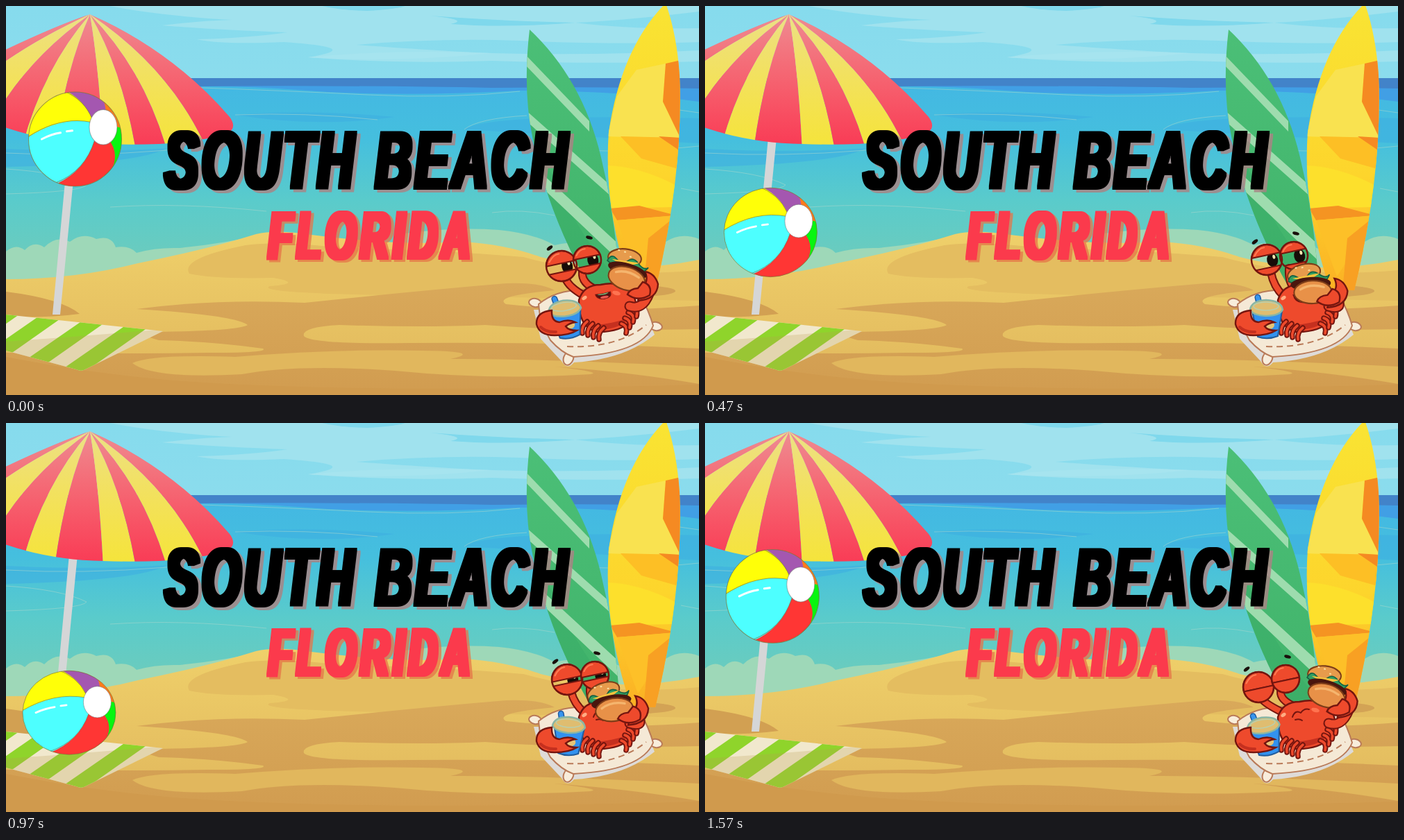
Animation of 998x561 px, one loop 1600 ms. Source, as an HTML page:

```html
<!DOCTYPE html>
<html lang="en">
<head>
<meta charset="utf-8">
<title>South Beach</title>
<style>
html, body { margin: 0; width: 100%; height: 100%; overflow: hidden; }
svg { display: block; width: 100vw; height: 100vh; }
text { font: italic 700 116px "Liberation Sans", Arial, sans-serif; }
</style>
</head>
<body>
<svg viewBox="0 0 998 561" preserveAspectRatio="none">
  <defs>
    <linearGradient id="sky" x2="0" y2="1"><stop stop-color="#86dbed"/><stop offset="1" stop-color="#8bdced"/></linearGradient>
    <linearGradient id="sea" x2="0" y2="1">
      <stop stop-color="#43b7e3"/><stop offset=".3" stop-color="#45bfde"/>
      <stop offset=".6" stop-color="#5acbcb"/><stop offset="1" stop-color="#72ccb8"/>
    </linearGradient>
    <linearGradient id="sand" x2="0" y2="1"><stop stop-color="#efd06a"/><stop offset="1" stop-color="#e0b65c"/></linearGradient>
    <linearGradient id="dark" x2="0" y2="1"><stop stop-color="#d9a95a"/><stop offset="1" stop-color="#d19c50"/></linearGradient>
    <linearGradient id="fade" x2="0" y2="1"><stop stop-color="#e3ddd0" stop-opacity=".5"/><stop offset="1" stop-color="#f2d4b0" stop-opacity="0"/></linearGradient>
    <linearGradient id="leaf" x2="0" y2="1"><stop stop-color="#4bbf77"/><stop offset="1" stop-color="#41b36a"/></linearGradient>
    <linearGradient id="gold" x2="0" y2="1"><stop stop-color="#f9e433"/><stop offset=".6" stop-color="#fdd52c"/><stop offset="1" stop-color="#fbb024"/></linearGradient>
    <clipPath id="canopyClip"><path d="M121 12Q60 32-60 92L-60 150Q30 197 140 199Q260 203 318 184Q334 176 322 160Q240 65 121 12Z"/></clipPath>
    <clipPath id="greenClip"><path id="greenShape" d="M754 34Q744 120 758 188Q780 300 842 408Q860 422 884 400Q876 300 860 232Q835 110 754 34Z"/></clipPath>
    <clipPath id="goldClip"><path id="goldShape" d="M950-4Q886 60 868 182Q860 290 900 408L935 410Q976 240 970 100Q966 40 950-4Z"/></clipPath>
    <clipPath id="towelClip"><path d="M0 445L226 469L112 525Q107 527 101 524L0 497Z"/></clipPath>
    <clipPath id="ballClip"><circle r="67"/></clipPath>
    <filter id="heavyBig" x="-5%" y="-20%" width="110%" height="140%" color-interpolation-filters="sRGB">
      <feMorphology operator="dilate" radius="4 2" result="fat"/>
      <feOffset dx="5" dy="4"/><feComponentTransfer result="soft"><feFuncR type="linear" slope="0" intercept=".66"/><feFuncG type="linear" slope="0" intercept=".52"/><feFuncB type="linear" slope="0" intercept=".52"/><feFuncA type="linear" slope=".85"/></feComponentTransfer>
      <feMerge><feMergeNode in="soft"/><feMergeNode in="fat"/></feMerge>
    </filter>
    <filter id="heavySmall" x="-5%" y="-20%" width="110%" height="140%" color-interpolation-filters="sRGB">
      <feMorphology operator="dilate" radius="4 2" result="fat"/>
      <feOffset dx="4" dy="3"/><feComponentTransfer result="soft"><feFuncR type="linear" slope="0" intercept=".9"/><feFuncG type="linear" slope="0" intercept=".46"/><feFuncB type="linear" slope="0" intercept=".28"/><feFuncA type="linear" slope=".75"/></feComponentTransfer>
      <feMerge><feMergeNode in="soft"/><feMergeNode in="fat"/></feMerge>
    </filter>
  </defs>

  <rect width="998" height="105" fill="url(#sky)"/>
  <g fill="#a9e4ef">
    <path d="M150 0H998V8Q900 20 820 24Q900 34 998 32V52Q880 56 740 50Q620 46 505 56Q640 66 700 68Q560 82 435 74Q520 60 400 52Q310 56 275 48Q350 46 405 38Q300 34 225 28Q270 22 325 20Q220 14 150 0Z" opacity=".75"/>
    <path d="M435 74Q560 62 700 68Q850 72 998 64V80Q830 84 700 79Q560 84 435 74Z" opacity=".75"/>
    <path d="M455 0H575Q560 5 520 7Q480 6 455 0Z" fill="#7fd8ec"/>
    <path d="M610 14Q720 22 820 24Q720 32 640 26Q670 20 610 14Z" fill="#7fd8ec"/>
  </g>
  <rect y="104" width="998" height="295" fill="url(#sea)"/>
  <path d="M0 104H998V138Q880 122 740 122Q560 132 420 121Q330 114 240 117H0Z" fill="#419fe5"/>
  <path d="M0 104H998V119Q860 116 700 118Q500 114 240 116H0Z" fill="#4283c9"/>
  <g fill="#3fb0e2" opacity=".6">
    <path d="M330 157Q430 148 560 160Q450 176 330 157ZM660 178Q690 155 998 162V198Q800 186 660 178ZM0 206Q120 212 232 205Q190 228 0 232Z"/>
  </g>
  <g fill="none" stroke="#a9d8cc" stroke-opacity=".55">
    <path d="M255 117Q400 122 520 128T740 123M330 157Q430 153 535 164M660 178Q680 162 750 158M0 212Q110 218 232 208M0 235Q80 240 116 258Q110 268 0 271M150 290Q250 283 375 296M840 208Q900 212 998 202M700 298Q740 292 790 302M970 150L998 154M972 263L998 268"/>
  </g>
  <g fill="#9ed8b8">
    <path d="M0 354Q14 342 27 352Q40 338 55 348Q72 330 92 340Q110 326 130 336Q152 330 158 348Q178 345 188 356Q215 348 250 349Q320 342 380 327V400H0Z"/>
    <path d="M560 330Q640 318 710 323Q760 328 790 345Q840 334 890 352Q930 350 950 340Q972 326 998 336V400H560Z"/>
  </g>
  <path d="M0 394Q100 394 190 371Q290 351 360 329Q390 322 440 330Q560 346 660 340Q720 344 770 362Q880 390 998 366V561H0Z" fill="url(#sand)"/>
  <path d="M345 345Q250 364 264 386Q300 394 385 392Q430 400 380 404Q360 412 500 416L998 425V381Q860 394 745 362Q600 350 480 349Q400 338 345 345Z" fill="#e4bd60"/>
  <path d="M0 412Q80 422 106 444Q60 450 0 448Z" fill="#d2a052"/>
  <path d="M188 437Q300 422 430 428Q600 410 720 400Q770 398 790 410Q700 418 720 430Q850 444 998 432V466Q820 470 690 460Q600 464 480 460Q425 463 429 476Q440 488 580 486Q800 484 998 494V561H0V500Q200 502 290 500Q380 500 370 494Q300 484 220 482L180 470Q330 470 348 460Q330 446 188 437Z" fill="url(#dark)"/>
  <path d="M182 515Q210 502 330 506Q480 494 600 497Q690 498 640 509Q760 508 998 520V545Q900 528 790 520Q860 528 842 531Q700 540 560 526Q420 516 340 531Q210 538 182 515Z" fill="#e1b75d"/>
  <path d="M0 506Q120 530 240 540Q500 560 998 546V561H0Z" fill="#d09a4d"/>
  <ellipse cx="894" cy="411" rx="70" ry="9" fill="#d3a355"/>
  <path d="M91 190L103 190L78 445L67 445Z" fill="#d5d6d7"/>
  <g id="canopy" clip-path="url(#canopyClip)"></g>
  <g id="towel" clip-path="url(#towelClip)"></g>

  <use href="#greenShape" fill="url(#leaf)"/>
  <g clip-path="url(#greenClip)">
    <path d="M746 130Q790 290 884 400L830 420L740 220Z" fill="#2f9f62" opacity=".25"/>
    <path d="M746 68L840 166V181L746 83ZM746 148L872 260V275L746 163ZM770 240L884 345V368L770 260Z" fill="#9edcae"/>
  </g>
  <use href="#goldShape" fill="url(#gold)"/>
  <g clip-path="url(#goldClip)">
    <path d="M908 92L950 83L946 138L972 192L866 188L880 130Z" fill="#f9e250"/>
    <path d="M950 83L972 78V192L946 138Z" fill="#f58a22"/>
    <path d="M885 188L972 190V236L915 220Z" fill="#fdbf25"/>
    <path d="M940 188L972 190V210Z" fill="#f58a22"/>
    <path d="M862 230Q910 230 968 260L960 290L866 292Z" fill="#fde02c"/>
    <path d="M870 292L912 288L965 302L880 309Z" fill="#f59422"/>
    <path d="M880 309L966 302L940 345L910 390Z" fill="#fdc028"/>
    <path d="M925 335L966 302L940 412H918Z" fill="#f8a023"/>
  </g>

  <g filter="url(#heavyBig)"><text transform="translate(229 263) scale(.62 1)" letter-spacing="8" word-spacing="3">SOUTH BEACH</text></g>
  <g filter="url(#heavySmall)"><text transform="translate(378 364) scale(.58 1)" letter-spacing="11.500" style="font-size:97px" fill="#fb3a4c">FLORIDA</text></g>

  <g id="ball">
    <g clip-path="url(#ballClip)">
      <rect x="-70" y="-70" width="140" height="140" fill="#ffff08"/>
      <path d="M-20-72Q12-58 24-30L45-20L44-75Z" fill="#a457b0"/>
      <path d="M36-62Q46-50 44-30L75 0V-70Z" fill="#ff7a1c"/>
      <path d="M50-20L75-14V60L40 50Z" fill="#08f510"/>
      <path d="M27 0L48 0Q66 22 50 48L30 80H-40L-30 62Q14 42 27 0Z" fill="#ff3634"/>
      <path d="M-72 0Q-22-33 24-24L28 2Q14 46-28 64L-80 70Z" fill="#4dffff"/>
      <g fill="none" stroke="#6b6740" stroke-opacity=".6"><path d="M-68-3Q-22-33 24-24M28 2Q14 46-28 62M-20-70Q12-58 24-30"/></g>
    </g>
    <ellipse cx="40.500" cy="-17" rx="20" ry="25" fill="#fff" stroke="#777" stroke-opacity=".6"/>
    <circle r="67" fill="none" stroke="#6b6740" stroke-opacity=".65"/>
    <path d="M-48 0Q-34-7-21-9M-12-11L-4-12" fill="none" stroke="#fff" stroke-width="3" stroke-linecap="round"/>
  </g>
  <g id="crab"></g>
</svg>
<script>
const $ = id => document.getElementById(id);
const RED = '#ee4a2c', DEEP = '#c5301f', INK = '#74150f';
const LOOP = 1600;

// Umbrella panels fan out from the tip to these points on the rim.
const rim = [-330, -130, -40, 22, 70, 140, 187, 232, 290, 380];
const bend = x => `${121 + (x - 121) * .7} 92`;
$('canopy').innerHTML = rim.slice(1).map((x, i) =>
  `<path d="M121 12Q${bend(rim[i])} ${rim[i]} 208H${x}Q${bend(x)} 121 12Z" fill="${i % 2 ? '#f5e43c' : '#f93c56'}"/>`
).join('') + '<rect x="-60" y="10" width="400" height="190" fill="url(#fade)"/>';

$('towel').innerHTML = '<rect y="440" width="230" height="90" fill="#f1e8cd"/>' +
  [-10, 58, 130, 202].map(x => `<path d="M${x} 440h36l-125 88h-38Z" fill="#8fd42b"/>`).join('') +
  '<path d="M0 484Q90 478 230 466V530H0Z" fill="#b89a50" opacity=".25"/>';

// Smooth curve through rows of [time, value, value, ...].
function track(rows, t) {
  const slope = (i, c) => {
    const a = rows[Math.max(i - 1, 0)], b = rows[Math.min(i + 1, rows.length - 1)];
    return (b[c] - a[c]) / (b[0] - a[0]);
  };
  let i = 0;
  while (i < rows.length - 2 && t > rows[i + 1][0]) i++;
  const p = rows[i], q = rows[i + 1], d = q[0] - p[0];
  const u = Math.min(1, (t - p[0]) / d), v = 1 - u;
  return p.slice(1).map((a, k) => {
    const c = k + 1;
    return a * v * v * (1 + 2 * u) + q[c] * u * u * (3 - 2 * u) +
      slope(i, c) * d * u * v * v - slope(i + 1, c) * d * u * u * v;
  });
}

const bounce = [[0, 192], [300, 269], [470, 327.5], [730, 407], [855, 426], [970, 417], [1170, 357], [1570, 249]];

// time, left eye x y, right eye x y, lids, mouth, burger x y angle, cup angle
const poses = [
  [0, 800, 375, 837, 366, .45, .2, 895, 381, 10, -8],
  [300, 805, 366, 845, 362, .65, 1, 900, 384, 14, -4],
  [470, 809, 366, 848, 360, .65, .5, 872, 401, -10, 0],
  [730, 809, 368, 847, 360, .62, 0, 866, 406, -24, 5],
  [970, 808, 370, 848, 364, .22, 0, 872, 402, -16, 4],
  [1170, 803, 375, 841, 366, 0, 0, 903, 386, 16, -4],
  [1570, 797, 381, 836, 369, 0, 0, 896, 381, 10, -9]
];

const clamp = x => Math.max(0, Math.min(1, x));
const oval = (x, y, rx, ry, fill, a = 0, extra = `stroke="${INK}" stroke-width="2.200"`) =>
  `<ellipse rx="${rx}" ry="${ry}" fill="${fill}" transform="translate(${x} ${y}) rotate(${a})" ${extra}/>`;
const line = (d, w, color) =>
  `<path d="${d}" fill="none" stroke="${color}" stroke-width="${w}" stroke-linecap="round" stroke-linejoin="round"/>`;
const limb = (d, w) => line(d, w + 4, INK) + line(d, w, RED);
const flesh = d => `<path d="${d}" fill="${RED}" stroke="${INK}" stroke-width="2.400"/>`;

function eye(x, y, r, open) {
  const cap = (h, top) => {
    const w = Math.sqrt(r * r - h * h);
    const big = +(top ? h > 0 : h < 0);
    return `<path d="M${-w} ${h}A${r} ${r} 0 ${big} ${+top} ${w} ${h}Z" fill="${RED}" stroke="${INK}" stroke-width="2"/>`;
  };
  const iris = open > .05
    ? oval(8, 2, 8, 10, '#160c08', 0, '') + oval(11, -2, 2, 3, '#f5e8b0', 0, '') : '';
  return `<g transform="translate(${x} ${y}) rotate(-12)">${iris}${cap(2 - open * 13, true)}${cap(2 + open * 15, false)}
    <circle r="${r}" fill="none" stroke="${INK}" stroke-width="2.500"/>
    ${line(`M${-r + 6} -9Q-8 ${-r + 3} 0 ${-r + 4}`, 2, '#ff7d55')}</g>`;
}

function burger(x, y, a) {
  const crust = 'stroke="#7d3d18" stroke-width="2"';
  return `<g transform="translate(${x} ${y}) rotate(${a}) scale(1 1.100)">
    ${oval(-7, -15, 24, 12, '#e79b4c', -4, crust)}
    <path d="M-31 -8Q-27 -19 -18 -12T-2 -12T14 -11T29 -8Q22 3 14 -3T-3 -2T-20 -2Z" fill="#2f9d61" stroke="#155f43" stroke-width="1.500"/>
    <path d="M-25 -11L16 -12L-4 -4Z" fill="#f6c43d"/>
    ${oval(0, 0, 29, 9, '#4a160e', 6, '')}
    ${oval(1, 11, 27, 15, '#e89148', 6, crust)}
    ${line('M-16 5Q0 -1 18 7', 3, '#f5b56e')}
    ${[-15, -6, 3].map(k => oval(k - 2, -21 + k % 4, 1.6, 1, '#fae0a2', 0, '')).join('')}</g>`;
}

function cup(a) {
  return `<g transform="rotate(${a} 810 465)">
    ${line('M796 420L799 433', 9, '#1d5a9e')}${line('M796 420L799 433', 6, '#3795ef')}
    <path d="M788 440L831 440L825 476Q810 482 796 477Z" fill="#3292ef" stroke="#225d9c" stroke-width="2"/>
    <path d="M785 438Q787 425 808 424Q830 425 832 438Q827 447 808 447Q789 446 785 438Z" fill="#dfbd70" stroke="#89b6a5" stroke-width="2.500"/>
    ${oval(808, 433, 18, 6, 'none', 0, 'stroke="#b9cfad" stroke-width="1.500"')}
    ${oval(813, 460, 7, 6, '#e5c477', 0, '')}</g>`;
}

const seam = 'stroke="#b97a58" stroke-width="2"';
const pillow = `
  <path d="M760 438L770 480L800 512Q808 526 818 514Q890 510 934 474L920 440Z" fill="#dedbd8"/>
  ${[[762, 428, 9, 6, 10], [936, 462, 9, 6, 10], [810, 508, 7, 10, 20]].map(([x, y, a, b, r]) =>
    oval(x, y, a, b, '#f8eddb', r, seam)).join('')}
  <path d="M767 430Q794 408 836 410Q880 404 914 418Q926 440 932 461Q916 501 817 506Q800 500 784 482Q768 456 767 430Z" fill="#f5e9d6" ${seam}/>
  <path d="M808 491Q880 494 922 460" fill="none" ${seam} stroke-dasharray="9 6"/>`;

const legs = [0, 1, 2, 3].map(i => {
  const x = 833 + i * 8, y = 460 + i * 3, r = 890 + i * 5, s = 463 - i * 8;
  return limb(`M${x + 4} ${y - 5}Q${x - 5} ${y + 2} ${x - 3} ${y + 12}`, 3.5) +
    limb(`M${r - 4} ${s - 5}Q${r + 6} ${s - 2} ${r + 3} ${s + 9}`, 3.5);
}).join('');

const body = flesh('M825 424Q832 402 856 402Q882 396 899 410Q914 430 902 453Q885 471 850 470Q824 462 825 424Z') +
  `<path d="M832 455Q850 466 899 449Q884 467 850 467Q837 464 832 455Z" fill="${DEEP}"/>` + legs +
  oval(833, 421, 4, 2.5, '#ffac83', -35, '') + oval(879, 414, 6, 3, '#ff7350', 15, '');

function mouth(m) {
  if (m < .12) return line('M846 424Q850 413 858 418Q863 411 870 413M850 428Q856 426 860 429', 2, INK);
  return `<g transform="translate(860 ${416 + 7 * m}) rotate(-10) scale(${.7 + .3 * m} ${.25 + .75 * m})">
    <path d="M-14 -8Q0 -5 14 -9Q17 12 2 13Q-13 12 -14 -8Z" fill="#541112" stroke="${INK}" stroke-width="2.200"/>
    ${oval(2, 7, 8, 5, '#e95650', 0, '')}
    <path d="M-11 -7Q0 -5 11 -8Q9 -2 0 -2Q-9 -2 -11 -7Z" fill="#6fae74"/></g>`;
}

function crab(t) {
  const [lx, ly, rx, ry, lids, gape, bx, by, turn, tilt] = track(poses, t);
  const open = clamp(lids), ex = 925 - (900 - bx) * .6, ey = 405 + (by - 381) * .5;
  const brow = (x, y, a) => oval(x, y, 5, 2.4, '#190f0b', a, '');
  return pillow +
    limb(`M${lx + 6} ${ly + 18}Q${lx + 10} 405 833 418`, 8) +
    limb(`M${rx - 7} ${ry + 18}Q${rx - 8} 400 850 409`, 8) +
    eye(lx, ly, 22, open) + eye(rx, ry, 20, open) +
    brow(lx - 17, ly - 26, -38) + brow(rx + 3, ry - 32, 15) +
    body + mouth(clamp(gape)) +
    limb(`M898 433Q917 439 ${ex + 4} ${ey + 10}`, 11) +
    flesh(`M${ex - 12} ${ey + 20}Q${ex + 16} ${ey + 18} ${ex + 17} ${ey - 4}Q${ex + 12} ${ey - 20} ${ex - 2} ${ey - 22}Q${ex + 5} ${ey - 8} ${ex - 7} ${ey + 2}Z`) +
    burger(bx, by, turn) +
    flesh(`M${ex + 5} ${ey + 12}Q${ex - 12} ${ey + 22} ${ex - 27} ${ey + 11}Q${ex - 24} ${ey + 3} ${ex - 12} ${ey + 2}L${ex - 5} ${ey - 7}Q${ex + 9} ${ey - 3} ${ex + 5} ${ey + 12}Z`) +
    cup(tilt) +
    flesh('M786 439Q763 441 764 459Q768 475 790 475Q811 475 822 468Q810 468 806 462Q812 457 820 456Q810 451 797 456Q785 455 786 439Z') +
    line('M770 463Q778 471 792 470', 4, DEEP);
}

function draw(ms) {
  // Thirty steps a second; the lowest part of the bounce holds for one extra step.
  let step = Math.floor((ms % LOOP + 4) * .03);
  if (step === 23) step = 22;
  const t = Math.min(step / .03, 1570);
  const y = track(bounce, t)[0];
  const x = 99.5 - (y - 192) * .0378;
  const tall = Math.min(137, 137 - (y - 235) * .083);
  $('ball').setAttribute('transform', `translate(${x} ${y}) scale(1 ${tall / 135})`);
  $('crab').innerHTML = crab(t);
}

const start = performance.now();
function tick(now) {
  draw(Math.max(0, now - start));
  requestAnimationFrame(tick);
}
draw(0);
requestAnimationFrame(tick);
</script>
</body>
</html>
```
